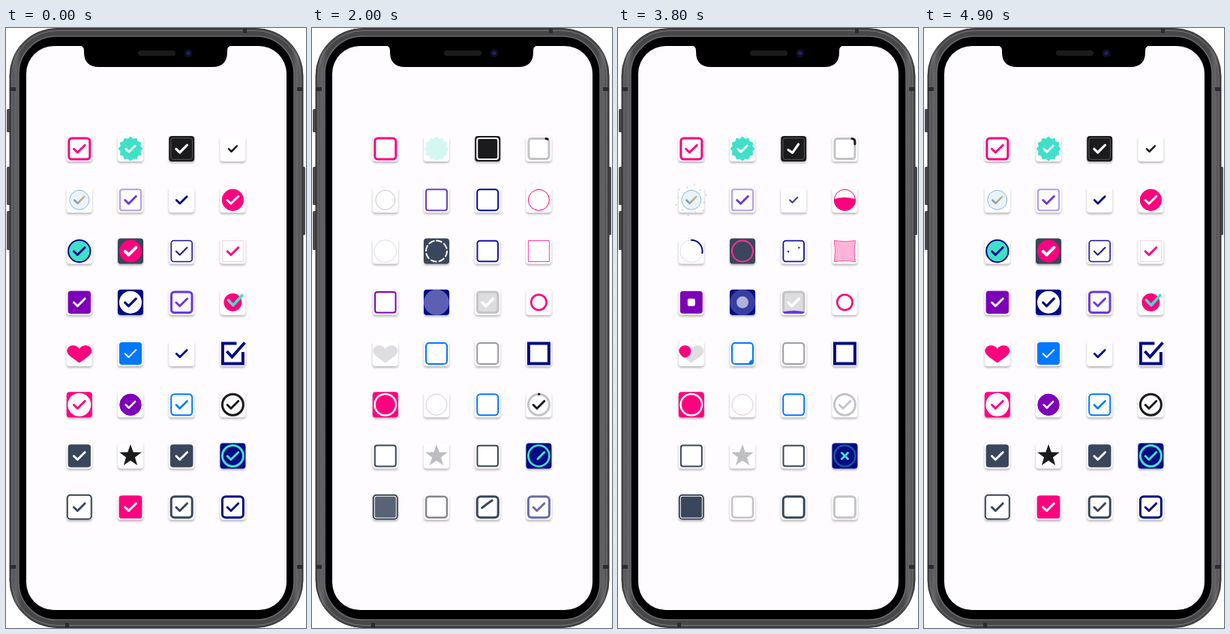
Write an HTML page with a canvas that moves like this. It is 400 px wide and 800 px high and loops after 5000 ms.

```html
<!DOCTYPE html>
<html lang="en">
<head>
<meta charset="utf-8">
<title>Checkbox collection</title>
<style>
html, body { margin: 0; width: 100%; height: 100%; overflow: hidden; background: #fff; }
svg, canvas { position: absolute; left: 0; top: 0; width: 400px; height: 800px; }
</style>
</head>
<body>
<svg viewBox="0 0 400 800">
  <defs>
    <linearGradient id="metal" x1="0" x2="1" y1="0" y2="0">
      <stop offset="0" stop-color="#3c3c3e"/><stop offset=".02" stop-color="#656567"/>
      <stop offset=".04" stop-color="#47474a"/><stop offset=".96" stop-color="#47474a"/>
      <stop offset=".98" stop-color="#656567"/><stop offset="1" stop-color="#3c3c3e"/>
    </linearGradient>
  </defs>
  <g fill="#4a4a4c">
    <rect x="1" y="108" width="6" height="31" rx="1.5"/>
    <rect x="1" y="185" width="6" height="51" rx="1.5"/>
    <rect x="1" y="244" width="6" height="52" rx="1.5"/>
    <rect x="393" y="185" width="6" height="91" rx="1.5"/>
  </g>
  <rect x="5" y=".5" width="391" height="799" rx="63" fill="url(#metal)" stroke="#333335"/>
  <rect x="8" y="3.5" width="385" height="793" rx="60" fill="none" stroke="#78787a"/>
  <g fill="#2c2c2e">
    <rect x="316" y="0" width="5" height="7"/><rect x="79" y="793" width="5" height="7"/>
    <rect x="5" y="79" width="8" height="5"/><rect x="388" y="79" width="8" height="5"/>
    <rect x="5" y="716" width="8" height="5"/><rect x="388" y="716" width="8" height="5"/>
  </g>
  <rect x="17" y="11" width="367" height="778" rx="50" fill="#000" stroke="#6a6a6c" stroke-width="1.5"/>
  <rect x="27" y="24" width="347" height="752" rx="37" fill="#fefcff"/>
  <path d="M98 23.5Q104 24 104 30V32Q104 52 124 52H275Q295 52 295 32V30Q295 24 301 23.5Z"/>
  <rect x="176" y="30" width="50" height="7" rx="3.5" fill="#1b1b1d"/>
  <circle cx="243" cy="33.5" r="5.5" fill="#0d0f22"/>
  <circle cx="243" cy="33.5" r="2.5" fill="#1c2560"/>
</svg>
<canvas id="c"></canvas>
<script>
const LOOP = 5000, STEP = 100, OFF = 650, ON = 3150, LAG = 35;
const PINK = '#ff007f', TEAL = '#40e0c8', INK = '#1b1b1d', NAVY = '#000a85', SLATE = '#39465b',
  VIOLET = '#6c38e0', PURPLE = '#7d00b8', BLUE = '#0078ff', GREY = '#c4c4c8', WHITE = '#ffffff';
const TAU = Math.PI * 2;
const TICK = [[-7.3, .3], [-2.5, 5], [7.3, -4.8]];
const canvas = document.getElementById('c'), g = canvas.getContext('2d');
const dpr = window.devicePixelRatio || 1;
canvas.width = 400 * dpr;
canvas.height = 800 * dpr;

const clamp = x => Math.max(0, Math.min(1, x));
const seg = (p, a, b) => { const x = clamp((p - a) / (b - a)); return x * x * (3 - 2 * x); };
const lerp = (a, b, p) => a + (b - a) * p;
const rgb = h => [1, 3, 5].map(i => parseInt(h.slice(i, i + 2), 16));
const mix = (a, b, p) => {
  const B = rgb(b);
  return `rgb(${rgb(a).map((v, i) => Math.round(lerp(v, B[i], clamp(p))))})`;
};
const morph = (A, B, p) => A.map((v, i) => [lerp(v[0], B[i][0], p), lerp(v[1], B[i][1], p)]);

function group(draw, { alpha = 1, scale = 1, turn = 0 } = {}) {
  if (alpha <= 0 || scale <= 0) return;
  g.save();
  g.globalAlpha *= alpha;
  g.rotate(turn);
  g.scale(scale, scale);
  draw();
  g.restore();
}
function clipped(path, draw) {
  g.save();
  g.beginPath();
  path();
  g.clip();
  draw();
  g.restore();
}
function stroke(col, w) {
  g.strokeStyle = col;
  g.lineWidth = w;
  g.stroke();
}
function fillBox(size, r, col) {
  if (size <= 0) return;
  g.beginPath();
  g.roundRect(-size / 2, -size / 2, size, size, r);
  g.fillStyle = col;
  g.fill();
}
// size is the outer edge
function box(size, r, w, col) {
  const s = size - w;
  g.beginPath();
  g.roundRect(-s / 2, -s / 2, s, s, r);
  stroke(col, w);
}
function disc(r, col, x = 0, y = 0) {
  if (r <= 0) return;
  g.beginPath();
  g.arc(x, y, r, 0, TAU);
  g.fillStyle = col;
  g.fill();
}
function ring(r, w, col, part = 1) {
  if (part <= 0 || w <= 0) return;
  g.beginPath();
  g.arc(0, 0, r, -TAU / 4, TAU * (part - .25));
  stroke(col, w);
}
// draws the stretch a..b of a polyline
function line(pts, col, w, a = 0, b = 1) {
  if (b - a < .005 || w <= 0) return;
  let len = 0;
  g.beginPath();
  pts.forEach(([x, y], i) => {
    g.lineTo(x, y);
    if (i) len += Math.hypot(x - pts[i - 1][0], y - pts[i - 1][1]);
  });
  g.setLineDash([(b - a) * len, len * 2]);
  g.lineDashOffset = -a * len;
  stroke(col, w);
  g.setLineDash([]);
  g.lineDashOffset = 0;
}
const tick = (col, w = 3, b = 1, a = 0) => line(TICK, col, w, a, b);
function spikes(n, R, r, col) {
  g.beginPath();
  for (let i = 0; i < n * 2; i++) {
    const d = i % 2 ? r : R, q = i * Math.PI / n - TAU / 4;
    g.lineTo(d * Math.cos(q), d * Math.sin(q));
  }
  g.closePath();
  g.fillStyle = col;
  g.fill();
}
function burst(age, n, col) {
  if (age <= 0 || age >= 1) return;
  for (let i = 0; i < n; i++) {
    const q = i * TAU / n + .2, d = lerp(13, i % 2 ? 25 : 20, Math.sqrt(age));
    group(() => disc(lerp(1.6, .6, age), col, d * Math.cos(q), d * Math.sin(q)), { alpha: 1 - age * age });
  }
}
function dome(y, bulge) {
  g.moveTo(-18, 20);
  g.lineTo(-18, y + bulge);
  g.quadraticCurveTo(0, y - bulge, 18, y + bulge);
  g.lineTo(18, 20);
  g.closePath();
}
function heart() {
  g.moveTo(0, 12.5);
  g.bezierCurveTo(-7, 7, -17, 2, -16.5, -4);
  g.bezierCurveTo(-15.5, -12, -4, -13, 0, -6);
  g.bezierCurveTo(4, -13, 15.5, -12, 16.5, -4);
  g.bezierCurveTo(17, 2, 7, 7, 0, 12.5);
}
// filled box whose white middle closes up
const hole = (col, end) => p => {
  fillBox(lerp(29.5, 30.5, p), 4, col);
  fillBox(25.5 * (1 - seg(p, 0, end)), 2, WHITE);
  tick(WHITE, 3, seg(p, end, 1));
};

// [duration, draw(p, up, age), tile colour]
const items = [
  [500, (p, up) => {
    box(31, 4, 3, PINK);
    if (up || p === 1) return tick(PINK, 3, p);
    if (p <= 0) return;
    g.beginPath();
    TICK.forEach(v => g.lineTo(...v));
    g.setLineDash([7 * p, 7 * (1 - p)]);
    stroke(PINK, 3);
    g.setLineDash([]);
  }],
  [700, p => {
    spikes(12, 16.5, 13.8, mix('#d5f7f1', TEAL, seg(p, 0, .3)));
    group(() => tick(WHITE, 3.4, seg(p, 0, .3)), { scale: .85 });
  }],
  [650, (p, up) => {
    box(29.5, 3, 1, '#58585a');
    group(() => box(30, 3, 2, WHITE), { alpha: 1 - seg(p, 0, .3) });
    group(() => tick(WHITE, 3.2), {
      alpha: seg(p, 0, .3), scale: seg(p, 0, .5), turn: -(1 - p) * (up ? 1.6 : .4)
    });
  }, INK],
  [1400, (p, up) => {
    const h = up ? (p - .36) * 316 : (p - .1) * 230;
    const L = 4 * 19 + TAU * 4, from = Math.max(0, h - 52), to = Math.min(h, L);
    group(() => box(30, 4, 3, GREY), { alpha: 1 - seg(h, 96, 122) });
    if (to > from) {
      g.setLineDash([to - from, L - to + from]);
      g.lineDashOffset = -(from + 19);
      box(30, 4, 3, INK);
      g.setLineDash([]);
      g.lineDashOffset = 0;
    }
    group(() => tick(INK, 3.3, seg(h, 112, 150)), { scale: .75 });
  }],
  [500, (p, up, age) => {
    group(() => disc(13, '#eaf3fb'), { alpha: seg(p, .65, 1) });
    ring(13, 1, mix(GREY, '#8fb6d8', p));
    const tint = g.createLinearGradient(-7, 0, 7, 0);
    tint.addColorStop(0, '#8498ae');
    tint.addColorStop(1, '#ccb878');
    group(() => tick(tint, 2.8, up ? p : 1), { alpha: seg(p, 0, .35), scale: .9 });
    if (up) burst((age - 330) / 400, 12, '#c9ccd6');
  }],
  [450, (p, up) => {
    group(() => box(30, 3, 2, mix('#6a3fcc', '#b59ce8', p)), { alpha: up ? 1 : 1 - .7 * Math.sin(Math.PI * p) });
    tick(VIOLET, 3, seg(p, 0, .35));
  }],
  [600, p => {
    group(() => box(30, 4, 2, NAVY), { alpha: 1 - seg(p, 0, .3) });
    group(() => tick(NAVY, 3), { scale: .95 * seg(p, .2, 1), alpha: seg(p, .2, .95) });
  }],
  [800, (p, up, age) => {
    if (up) burst((age - 600) / 420, 14, PINK);
    ring(14, 1, PINK);
    clipped(() => g.arc(0, 0, 14.5, 0, TAU), () => {
      g.beginPath();
      dome(lerp(16, -19, seg(p, .22, .75)), 4);
      g.fillStyle = PINK;
      g.fill();
    });
    tick(WHITE, 3, seg(p, .7, .95));
  }],
  [900, (p, up) => {
    ring(15, 1, '#dcdce2');
    group(() => disc(14.5, TEAL), { alpha: seg(p, .65, .82) });
    ring(14.7, 2, NAVY, clamp((p - .25) / .58));
    tick(NAVY, 3, up ? seg(p, .87, 1) : seg(p, .7, .9));
  }],
  [700, p => {
    const w = 2 + 12 * seg(p, .5, .9), dash = lerp(7, 11, seg(p, 0, .46));
    if (dash < 11) g.setLineDash([dash, 11 - dash]);
    ring(15 - w / 2, w, mix(WHITE, PINK, p * 1.7));
    g.setLineDash([]);
    tick(WHITE, 4, seg(p, .5, .8));
  }, SLATE],
  [850, p => {
    const q = seg(p, .25, .97) / 2;
    box(29.5, 3.5, lerp(2, 1.6, p), '#1c14a0');
    if (q >= .5) return tick('#1c14a0', 2);
    tick('#1c14a0', 2, q);
    tick('#1c14a0', 2, 1, 1 - q);
  }],
  [500, p => {
    const wob = Math.sin(Math.PI * p), k = wob * 2.5;
    g.beginPath();
    g.moveTo(-14, -14);
    g.quadraticCurveTo(0, -14 + k, 14, -14);
    g.quadraticCurveTo(14 - k, 0, 14, 14);
    g.quadraticCurveTo(0, 14 - k, -14, 14);
    g.quadraticCurveTo(-14 + k, 0, -14, -14);
    g.fillStyle = `rgba(255,0,127,${.3 * wob})`;
    g.fill();
    stroke(mix('#ff3d9c', '#f4d3e4', seg(p, .4, 1)), 1);
    tick(PINK, 3, seg(p, .6, 1));
  }],
  [500, hole(PURPLE, .8)],
  [500, p => {
    group(() => disc(17, '#5b60b5'), { alpha: 1 - p });
    group(() => disc(15 * seg(p, 0, .75), WHITE), { alpha: lerp(.35, 1, p) });
    tick(NAVY, 3.2, seg(p, .7, 1));
  }, NAVY],
  [500, p => {
    fillBox(30, 4, '#dddde0');
    box(30.5, 4, 3, GREY);
    tick(WHITE, 3.5);
    if (p < .05) return;
    clipped(() => dome(lerp(17, -19, seg(p, .1, .95)), 2.5), () => {
      fillBox(30, 4, mix(VIOLET, WHITE, seg(p, .5, 1)));
      box(30.5, 4, 3, VIOLET);
      tick(mix(WHITE, VIOLET, seg(p, .5, 1)), 3);
    });
  }],
  [800, p => {
    const q = seg(p, .16, .72), w = lerp(2.6, 12, q);
    ring(lerp(11.5, 12, q) - w / 2, w, PINK);
    line([[-6, -3], [.5, 4], [12.5, -9.5]], TEAL, 3.6, 0, seg(p, .7, 1));
  }],
  [350, p => {
    clipped(heart, () => {
      disc(20, '#dedee1');
      disc(33 * p, PINK, -9, -3);
    });
  }],
  [350, p => {
    box(30, 4, 2, BLUE);
    clipped(() => g.roundRect(-15, -15, 30, 30, 4), () => disc(46 * p, BLUE, 15, 15));
    tick(WHITE, 2, seg(p, .6, 1));
  }],
  [500, p => {
    group(() => box(30, 4, 2, '#9a9a9f'), { alpha: 1 - seg(p, 0, .4) });
    group(() => tick(mix('#a79fdc', NAVY, seg(p, .55, 1)), 3), { scale: seg(p, .1, .7) * lerp(2, .95, p) });
  }],
  [700, p => {
    const q = seg(p, 0, .5);
    g.lineCap = 'butt';
    g.lineJoin = 'miter';
    line([[lerp(15.5, 5, q), -13.5], [-13.5, -13.5], [-13.5, 13.5], [13.5, 13.5], [13.5, lerp(-15.5, -2, q)]], NAVY, 4);
    line([[-8, -3], [-1, 4.5], [16, -14.5]], NAVY, 4, 1 - seg(p, .2, .85));
  }],
  [400, p => {
    disc(15.5, WHITE);
    disc(13 * (1 - seg(p, 0, .6)), PINK);
    tick(PINK, 3, seg(p, .55, .88));
  }, PINK],
  [500, p => {
    ring(14, 1, mix('#dcc8d8', PURPLE, p));
    disc(14.5 * seg(p, .2, .95), PURPLE);
    group(() => tick(WHITE, 3, seg(p, .6, 1)), { scale: .85 });
  }],
  [300, p => {
    box(30, 4.5, 2, BLUE);
    tick(BLUE, 2.6, p);
  }],
  [700, (p, up) => {
    ring(14, 3, GREY);
    ring(14, 3, INK, seg(p, .18, 1));
    tick(mix(GREY, INK, up ? seg(p, .5, .9) : seg(p, 0, .2)), 3);
  }],
  [400, p => {
    box(30, 3, 2, SLATE);
    group(() => fillBox(30, 3, SLATE), { alpha: seg(p, 0, .4) });
    tick(WHITE, 3 * seg(p, .3, 1));
  }],
  [500, (p, up) => {
    if (up && p > .12 && p < .6) return ring(11.5, 7 * seg(p, .05, .3), mix(GREY, INK, p));
    group(() => spikes(5, 15.5, 6.3, mix('#bfbfc3', INK, seg(p, 0, .8))), {
      scale: up && p >= .6 ? seg(p, .4, 1) : 1
    });
  }],
  [400, hole(SLATE, .6)],
  [600, p => {
    const q = seg(p, .1, .5), x = 4;
    ring(14, lerp(2.5, 3, p), mix('#15569a', TEAL, seg(p, .18, .32)));
    group(() => {
      line([[-x, -x], [x, x]], TEAL, 3);
      line([[-x, x], [x, -x]], TEAL, 3);
    }, { alpha: 1 - seg(p, .18, .3) });
    if (p > .18) tick(TEAL, 3, 1, 1 - q);
  }, NAVY],
  [400, (p, up) => {
    box(34, 4, 2, SLATE);
    group(() => fillBox(28, 2, SLATE), { alpha: 1 - seg(p, .05, .15) });
    if (p < .1) return;
    line(morph([[-8, 0], [-2.5, 0], [8, 0]], TICK, seg(p, .3, .9)), SLATE, 3);
    if (up && p < .4) line([[-13, -9], [-10, -13]], SLATE, 1.2);
  }],
  [500, p => {
    box(30.5, 4, 2.6, mix(GREY, '#6f6f76', seg(p, 0, .5)));
    group(() => fillBox(30.5, 3, PINK), { scale: seg(p, .35, .8) });
    tick(WHITE, 3, seg(p, .7, 1));
  }],
  [400, p => {
    box(31, 4.5, 3, SLATE);
    line(morph([[-7.5, 1], [-1, -4], [6, -9]], TICK, seg(p, .3, .8)), SLATE, 3, 0, seg(p, 0, .25));
  }],
  [500, (p, up) => {
    const col = mix(GREY, NAVY, p);
    box(31, 4.5, 3, col);
    group(() => tick(col, 3, up ? p : 1), { alpha: seg(p, 0, .4) });
  }]
];

function render(t) {
  g.setTransform(dpr, 0, 0, dpr, 0, 0);
  g.clearRect(0, 0, 400, 800);
  items.forEach(([dur, draw, tile = WHITE], i) => {
    const up = t >= ON + LAG * i;
    const age = t - (up ? ON : OFF) - LAG * i;
    const p = age < 0 ? 1 : up ? clamp(age / dur) : 1 - clamp(age / dur);
    g.save();
    g.translate(97.8 + 68.2 * (i % 4), 161 + 68.25 * Math.floor(i / 4));
    g.save();
    g.shadowColor = 'rgba(0,0,0,.28)';
    g.shadowBlur = 3 * dpr;
    g.shadowOffsetY = 2 * dpr;
    fillBox(34, 4, tile);
    g.restore();
    g.lineCap = g.lineJoin = 'round';
    draw(p, up, age);
    g.restore();
  });
}

let start;
function frame() {
  const now = performance.now();
  start ??= now;
  render(Math.floor((now - start) / STEP) * STEP % LOOP);
  requestAnimationFrame(frame);
}
frame();
</script>
</body>
</html>
```
